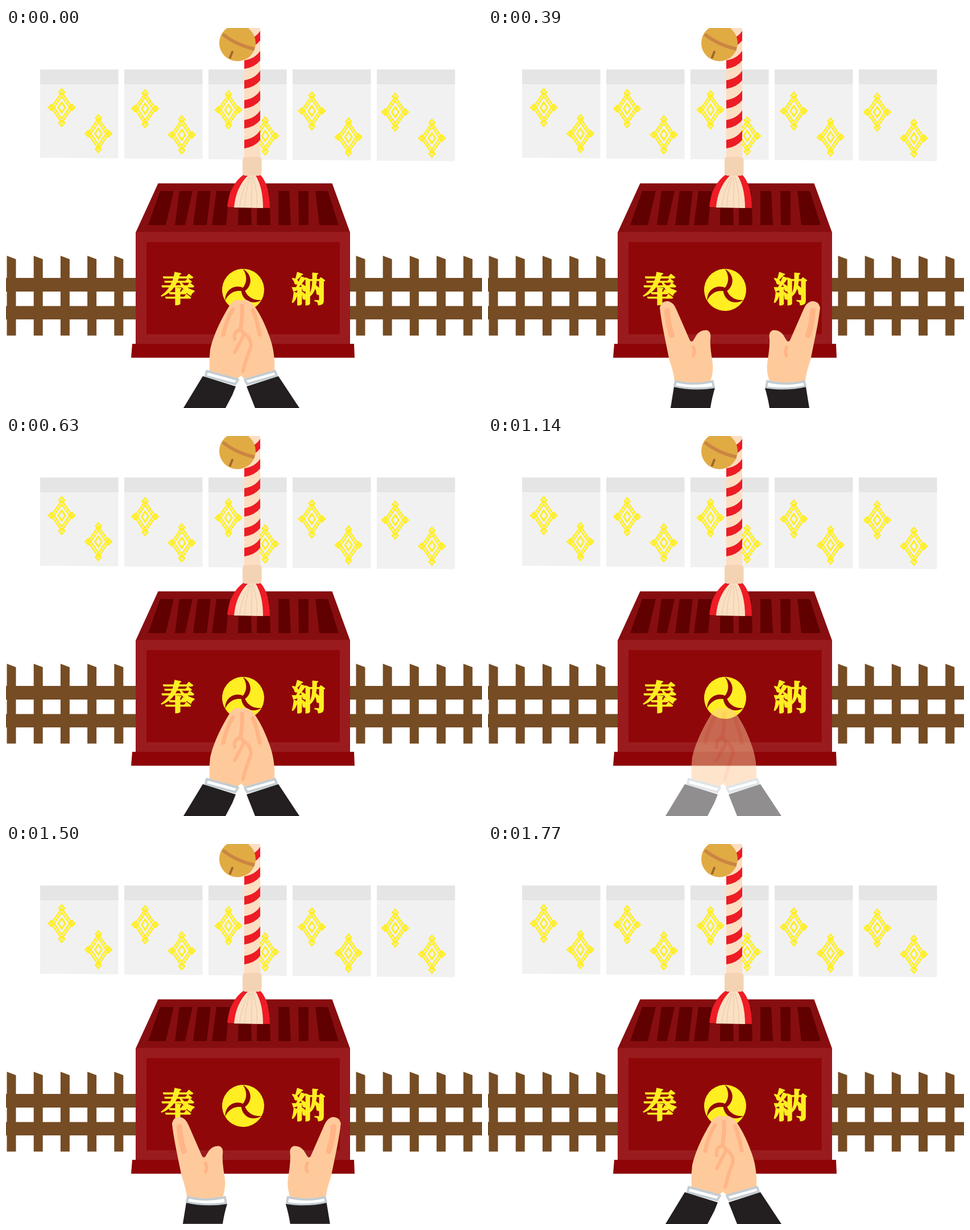
An HTML page for the animation above (1.8 s loop, 837 by 669 pixels).

```html
<!DOCTYPE html>
<html lang="ja">
<head>
<meta charset="utf-8">
<style>
html, body { margin: 0; width: 100%; height: 100%; overflow: hidden; background: #fff; }
svg { display: block; width: 837px; height: 669px; }
text { font: 900 60px "Noto Serif CJK JP", "Noto Sans CJK JP", "Noto Sans CJK", serif; text-anchor: middle; fill: #ffee22; stroke: #ffee22; stroke-width: 1.8; }
.skin { fill: #ffca9b; }
.crease { fill: none; stroke: #ffb587; stroke-linecap: round; }
.cuff { fill: #fff; stroke: #c3ccd2; stroke-width: 4; stroke-linejoin: round; }
.sleeve { fill: #231f20; }
</style>
</head>
<body>
<svg viewBox="0 0 837 669">
  <defs>
    <g id="crest" fill="none" stroke="#ffee22" stroke-width="2.6">
      <path d="M0-27 18.500 0 0 27-18.500 0zM0-20 13.500 0 0 20-13.500 0z"/>
      <path d="M0-9 6 0 0 9-6 0z" stroke-width="3"/>
      <path d="M0-33 5-27 0-22-5-27zM0 33 5 27 0 22-5 27zM-23 0-18-5-14 0-18 5zM23 0 18-5 14 0 18 5z"/>
    </g>
    <path id="swirl" d="M-12-35C7-31 14-13 3 2L-3 0C3-11 1-25-12-35z" fill="#900709"/>
    <g id="hand">
      <path class="skin" d="M302 492Q305 480 317 481Q326 483 331 495L355 550Q358 554 361 550L367 540Q374 531 385 532Q393 535 391 547Q390 560 395 590Q397 610 389 626H329Q326 604 319 585C313 555 305 520 302 492z"/>
      <path class="crease" stroke-width="10" d="M315 498Q316 520 323 541"/>
      <path class="crease" stroke-width="6" d="M361 562Q365 570 361 577"/>
      <path class="cuff" d="M330 622Q360 630 395 622L397 633Q360 638 328 631z"/>
      <path class="sleeve" d="M327 632Q362 640 399 634Q394 650 391 669H321z"/>
    </g>
    <clipPath id="ropeShape"><path d="M419 0H447V230H419z"/></clipPath>
  </defs>

  <g id="panels"></g>
  <g id="fence" fill="#754c24"><path d="M0 440H837V464H0zM0 489.500H837V513H0z"/></g>

  <path fill="#870e10" d="M267.500 273.500H573.500L605 360H228z"/>
  <g id="slots" fill="#600000"></g>
  <path fill="#9a1b1d" d="M228 359H605V557H228z"/>
  <path fill="#900709" d="M247 377H587V539H247z"/>
  <path fill="#8e0407" d="M222 556H612L613 580.500H220z"/>
  <text x="302" y="482">奉</text>
  <text x="532" y="482">納</text>
  <g transform="translate(417 461) rotate(18)">
    <circle r="37" fill="#ffee22"/>
    <use href="#swirl"/>
    <use href="#swirl" transform="rotate(120)"/>
    <use href="#swirl" transform="rotate(240)"/>
  </g>

  <path fill="#fcdec2" d="M419 0H447V230H419z"/>
  <g id="stripes" fill="#ee1c25" clip-path="url(#ropeShape)"></g>
  <circle cx="407" cy="26.500" r="32" fill="#e1ab44"/>
  <path fill="none" stroke="#cb8543" stroke-width="6" d="M381 11Q405 30 437 37"/>
  <path fill="none" stroke="#a0672c" stroke-width="4" stroke-linecap="round" d="M398 42 394 52"/>
  <path fill="#ee1c25" d="M418 258H447Q464 277 464 317L389 315Q393 276 418 258z"/>
  <path fill="#fbe0c4" d="M427 258H438Q452 280 452 317L401 316Q404 280 427 258z"/>
  <path fill="none" stroke="#ecd0ae" stroke-width="1.500" d="M428 262Q413 288 411 316M430 262Q420 290 420 316M432 262V316M434 262Q443 290 441 316"/>
  <rect x="416" y="227" width="33.500" height="33" rx="5" fill="#f3d3b3"/>

  <g id="prayer">
    <path class="skin" d="M413 480Q404 475 394 487C378 513 365 540 359 566Q357 585 358 605L405 619L413 612L421 619L472 603C473 580 470 560 462 540C455 520 445 500 434 486Q424 475 413 480z"/>
    <path class="crease" stroke-width="7" d="M399 495Q387 515 382 540M434 497Q443 518 446 540M415 489Q416 510 412 532"/>
    <path class="crease" stroke-width="6" d="M402 548Q400 533 411 532Q419 532 417 543L402 571M418 537Q430 544 431 560Q422 582 417 604"/>
    <path class="cuff" d="M353 604 408 619 403 627 351 613zM420 619 473 604 476 612 424 627z"/>
    <path class="sleeve" d="M346 613 404 631 398 646 386 669H312zM423 631 479 613 516 669H438z"/>
  </g>
  <g id="apart">
    <use id="left" href="#hand"/>
    <g id="right"><use href="#hand" transform="matrix(-1 0 0 1 886 0)"/></g>
  </g>
</svg>
<script>
const el = id => document.getElementById(id);
const add = (id, markup) => el(id).insertAdjacentHTML("beforeend", markup);
const clamp = v => Math.max(0, Math.min(1, v));

for (let i = 0; i < 5; i++) {
  const x = 60 + i * 148, bottom = 228.5 + i * 1.25;
  add("panels", `<path fill="#f1f1f1" d="M${x} 73h137.500V${bottom + 1}L${x} ${bottom}z"/>
    <path fill="#e5e5e5" d="M${x} 73h137.500v26h-137.500z"/>
    <use href="#crest" x="${98 + i * 146.6}" y="${140 + i * 2}"/>
    <use href="#crest" x="${162.5 + i * 146.6}" y="${186 + i * 2}"/>`);
  for (const start of [1.5, 615.5])
    add("fence", `<path d="M${start + i * 47.2} 401l16 6V541.500h-16z"/>`);
}

// Slot edges: top left, top right, bottom right, bottom left
[[271, 295, 281, 250], [305, 328, 315, 297], [337, 360, 353, 329],
 [370, 393, 387, 362], [409, 430, 432, 408], [442, 463, 465, 441],
 [479, 498, 501, 479], [514, 532, 532, 515], [544, 566, 585, 551]]
  .forEach(([a, b, c, d]) => add("slots", `<path d="M${a} 287H${b}L${c} 347H${d}z"/>`));

for (let y = 2; y < 220; y += 35)
  add("stripes", `<path d="M419 ${y - 15}Q438 ${y - 18} 447 ${y - 32}v17Q438 ${y - 3} 419 ${y}z"/>`);

const LOOP = 1800, STEP = 30, FIRST = 90, SECOND = 1230;

function draw() {
  const time = Math.floor(performance.now() % LOOP / STEP) * STEP;
  const second = time >= SECOND - 90;
  const n = (time - (second ? SECOND : FIRST)) / STEP;
  const resting = !second && n < 0;

  const fadeOut = resting ? 1 : clamp((-2 - n) / 2);
  el("prayer").setAttribute("opacity", Math.max(fadeOut, clamp((n - 12) / 4)));
  el("apart").setAttribute("opacity", resting ? 0 : Math.min(clamp((n + 2) / 2), clamp((13 - n) / 2)));

  const away = 10 - Math.max(n, -1);
  el("left").setAttribute("transform", `translate(${-10.1 * away} ${-0.2 * away})`);
  el("right").setAttribute("transform", `translate(${4.75 * away} ${-0.2 * away})`);
  requestAnimationFrame(draw);
}
draw();
</script>
</body>
</html>
```
